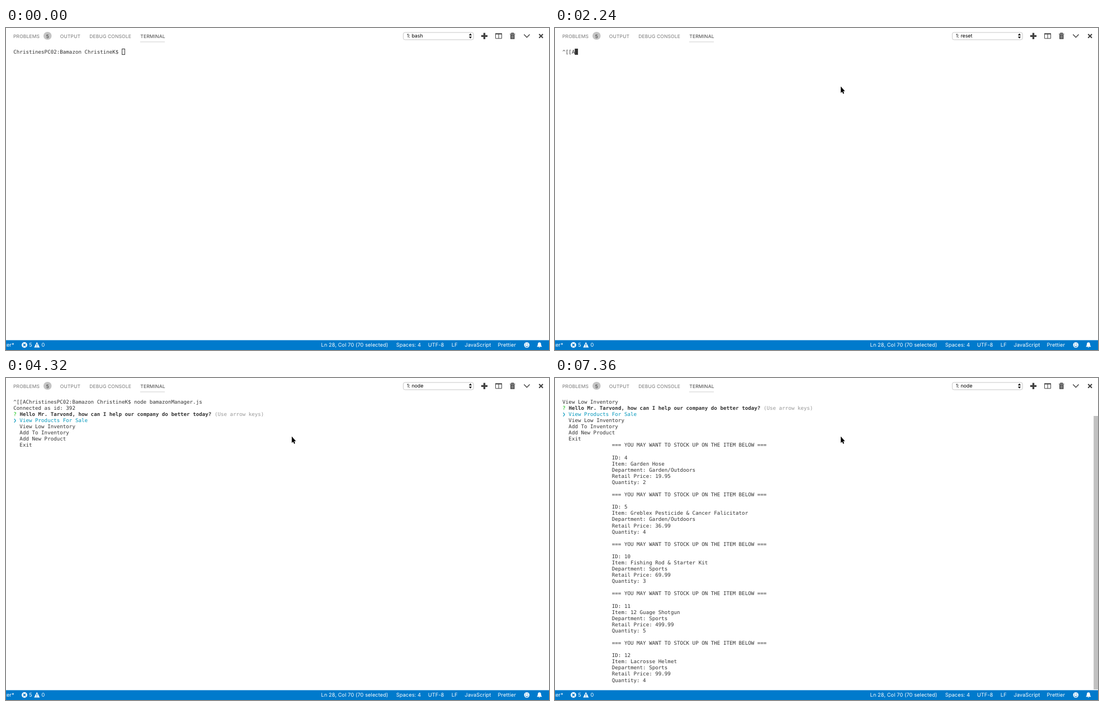
An HTML page that plays this animation: 971x577 px, repeating every 8 s.

```html
<!DOCTYPE html>
<html lang="en">
<head>
<meta charset="utf-8">
<title>Terminal session</title>
<style>
  html, body { margin: 0; width: 100%; height: 100%; overflow: hidden; background: #fff; }
  svg { display: block; }
  text { white-space: pre; text-rendering: geometricPrecision; }
  .tabs { font: 8.5px Inter, sans-serif; letter-spacing: .15px; fill: #767676; }
  .tabs .on { fill: #424242; }
  .tabs .count { fill: #333; letter-spacing: 0; }
  .status { font: 9.2px Inter, sans-serif; letter-spacing: .1px; fill: #fff; }
  #label { font: 8.8px Inter, sans-serif; }
  #screen { font: 9.2px "DejaVu Sans Mono", monospace; fill: #333; }
  .ask { fill: #00bc00; }
  .bold { font-weight: bold; }
  .pick { fill: #0598bc; }
  .hint { fill: #999; }
</style>
</head>
<body>
<svg width="971" height="577" viewBox="0 0 971 577">
  <g class="tabs">
    <text x="13" y="17.6">PROBLEMS</text>
    <rect x="67" y="7" width="14.6" height="14" rx="7" fill="#c4c4c4"/>
    <text class="count" x="74.3" y="17.5" text-anchor="middle">5</text>
    <text x="96.8" y="17.6">OUTPUT</text>
    <text x="149.2" y="17.6">DEBUG CONSOLE</text>
    <text class="on" x="240.3" y="17.6">TERMINAL</text>
    <path d="M240 24.9h44" stroke="#cfcfcf"/>
  </g>

  <rect x="710.4" y="8" width="125.6" height="13" rx="3" fill="#fff" stroke="#c8c8c8"/>
  <text id="label" x="716.8" y="17.4"></text>
  <path d="M827.8 13.2l2.6-3.4 2.6 3.4zM827.8 15.4l2.6 3.4 2.6-3.4z"/>

  <g fill="none" stroke="#424242">
    <path d="M849.8 14.4h11.2M855.4 8.8v11.2" stroke-width="3.4"/>
    <path d="M875.5 10.6h10.9v8.2h-10.9zM881 10v9"/>
    <path d="M875 10.4h11.9" stroke-width="2"/>
    <path d="M901 10.9h9.4M904 10.5v-1.4h3.4v1.4" stroke-width="1.3"/>
    <path d="M902 12h7.4v7.8h-7.4z" fill="#424242" stroke="none"/>
    <path d="M904.1 13v5.6M905.7 13v5.6M907.3 13v5.6" stroke="#fff" stroke-width=".5"/>
    <path d="M926.3 11.6l5.1 5.1 5.1-5.1" stroke-width="1.4"/>
    <path d="M953.3 11l6.8 6.8M960.1 11l-6.8 6.8" stroke-width="2"/>
  </g>

  <g id="screen"></g>
  <rect id="cursor" stroke="#333"/>
  <rect id="scrollbar" x="963.2" y="68" width="7.8" height="490" fill="#c1c1c1"/>
  <path id="cross" d="M-14 0h28M0 -14v28" fill="none" stroke="#000"/>
  <path id="arrow" d="M511 104.8v11.4l2.5-2.3 1.7 4 1.8-.8-1.7-3.8h3.2z"/>

  <rect y="559.4" width="971" height="17.6" fill="#007acc"/>
  <g class="status">
    <text x="14.6" y="571.4" text-anchor="end">master*</text>
    <circle cx="33" cy="568" r="5"/>
    <path d="M30.9 565.9l4.2 4.2M35.1 565.9l-4.2 4.2" stroke="#007acc" stroke-width="1.5"/>
    <text x="41.2" y="571.4">5</text>
    <path d="M55.3 562.8l5 9.8h-10z"/>
    <path d="M55.3 566v3.4M55.3 570.2v1.3" stroke="#007acc" stroke-width="1.2"/>
    <text x="63.4" y="571.4">0</text>
    <text x="563.6" y="571.4">Ln 28, Col 70 (70 selected)</text>
    <text x="697.8" y="571.4">Spaces: 4</text>
    <text x="754.8" y="571.4">UTF-8</text>
    <text x="796.8" y="571.4">LF</text>
    <text x="820.3" y="571.4">JavaScript</text>
    <text x="879.6" y="571.4">Prettier</text>
    <circle cx="931.3" cy="568" r="4.8"/>
    <path d="M929.6 565.4v1.8M933 565.4v1.8M928.5 569q2.8 3.6 5.6 0" fill="none" stroke="#007acc" stroke-width="1.2"/>
    <path d="M949.3 571.2q1.7-1.4 1.7-4.4 0-3.4 2.9-3.6 2.9.2 2.9 3.6 0 3 1.7 4.4zM952.6 571.8h2.6q-1.3 2-2.6 0z"/>
  </g>
</svg>
<script>
const LOOP = 8000, LEFT = 13.3, TOP = 37, COL = 5.54, ROW = 11.08;
const $ = id => document.getElementById(id);
const span = (style, text) => `<tspan class="${style}">${text}</tspan>`;

const prompt = 'ChristinesPC02:Bamazon ChristineK$ ';
const again = '^[[A' + prompt;
const command = again + 'node bamazonManager.js';
const connected = 'Connected as id: 392';
const question = span('ask', '?') + ' ' +
  span('bold', 'Hello Mr. Tarvond, how can I help our company do better today?') + ' ';
const hint = span('hint', '(Use arrow keys)');
const choices = ['View Products For Sale', 'View Low Inventory', 'Add To Inventory', 'Add New Product', 'Exit'];
const menu = picked => choices.map((c, i) => i === picked ? span('pick', '❯ ' + c) : '  ' + c);

const stock = [
  [4, 'Garden Hose', 'Garden/Outdoors', 19.95, 2],
  [5, 'Greblex Pesticide &amp; Cancer Falicitator', 'Garden/Outdoors', 36.99, 4],
  [10, 'Fishing Rod &amp; Starter Kit', 'Sports', 69.99, 3],
  [11, '12 Guage Shotgun', 'Sports', 499.99, 5],
  [12, 'Lacrosse Helmet', 'Sports', 99.99, 4]
];
const report = stock.flatMap(([id, item, department, price, quantity]) => [
  '=== YOU MAY WANT TO STOCK UP ON THE ITEM BELOW ===', '',
  `ID: ${id}`, `Item: ${item}`, `Department: ${department}`,
  `Retail Price: ${price}`, `Quantity: ${quantity}`, ''
].map(line => ' '.repeat(16) + line));

// Each step: start time, shell label, lines, cursor [column, row], extras
const steps = [
  [0, 'bash', [prompt], [35, 0], { hollow: true }],
  [800, 'bash', [prompt], [35, 0], { hollow: true, cross: [534, 54] }],
  [960, 'bash', [prompt], [35, 0], { hollow: true, cross: [514, 111] }],
  [1120, 'bash', [prompt], [35, 0]],
  [1280, 'bash', [prompt + 'reset'], [40, 0]],
  [1760, 'reset', [], [0, 0]],
  [2240, 'reset', ['^[[A'], [4, 0]],
  [2720, 'bash', [again + 'reset'], [44, 0]],
  [3520, 'bash', [command], [61, 0]],
  [4000, 'node', [command], [0, 1]],
  [4320, 'node', [command, connected, question + hint, ...menu(0)]],
  [5600, 'node', [command, connected, question, ...menu(1)]],
  [7200, 'node', [command, connected, question + span('pick', choices[1])], [0, 3]],
  [7360, 'node', [choices[1], question + hint, ...menu(0), ...report], null, { scroll: true }]
];

const show = (id, visible) => $(id).setAttribute('visibility', visible ? 'visible' : 'hidden');

function draw([start, label, lines, cursor, { hollow, cross, scroll } = {}]) {
  $('label').textContent = '1: ' + label;
  $('screen').innerHTML = lines.map((line, row) =>
    `<text x="${LEFT}" y="${(TOP + 8.9 + row * ROW).toFixed(2)}">${line}</text>`).join('');
  show('cursor', cursor);
  if (cursor) {
    const box = { x: LEFT + cursor[0] * COL + .4, y: TOP + cursor[1] * ROW + .5,
                  width: COL - .8, height: ROW - 1, fill: hollow ? 'none' : '#333' };
    for (const key in box) $('cursor').setAttribute(key, box[key]);
  }
  show('cross', cross);
  if (cross) $('cross').setAttribute('transform', `translate(${cross})`);
  show('arrow', start >= 1120);
  show('scrollbar', scroll);
}

let current;
function tick() {
  const time = performance.now() % LOOP;
  const step = steps.findLast(([start]) => start <= time);
  if (step !== current) draw(current = step);
  requestAnimationFrame(tick);
}
tick();
</script>
</body>
</html>
```
